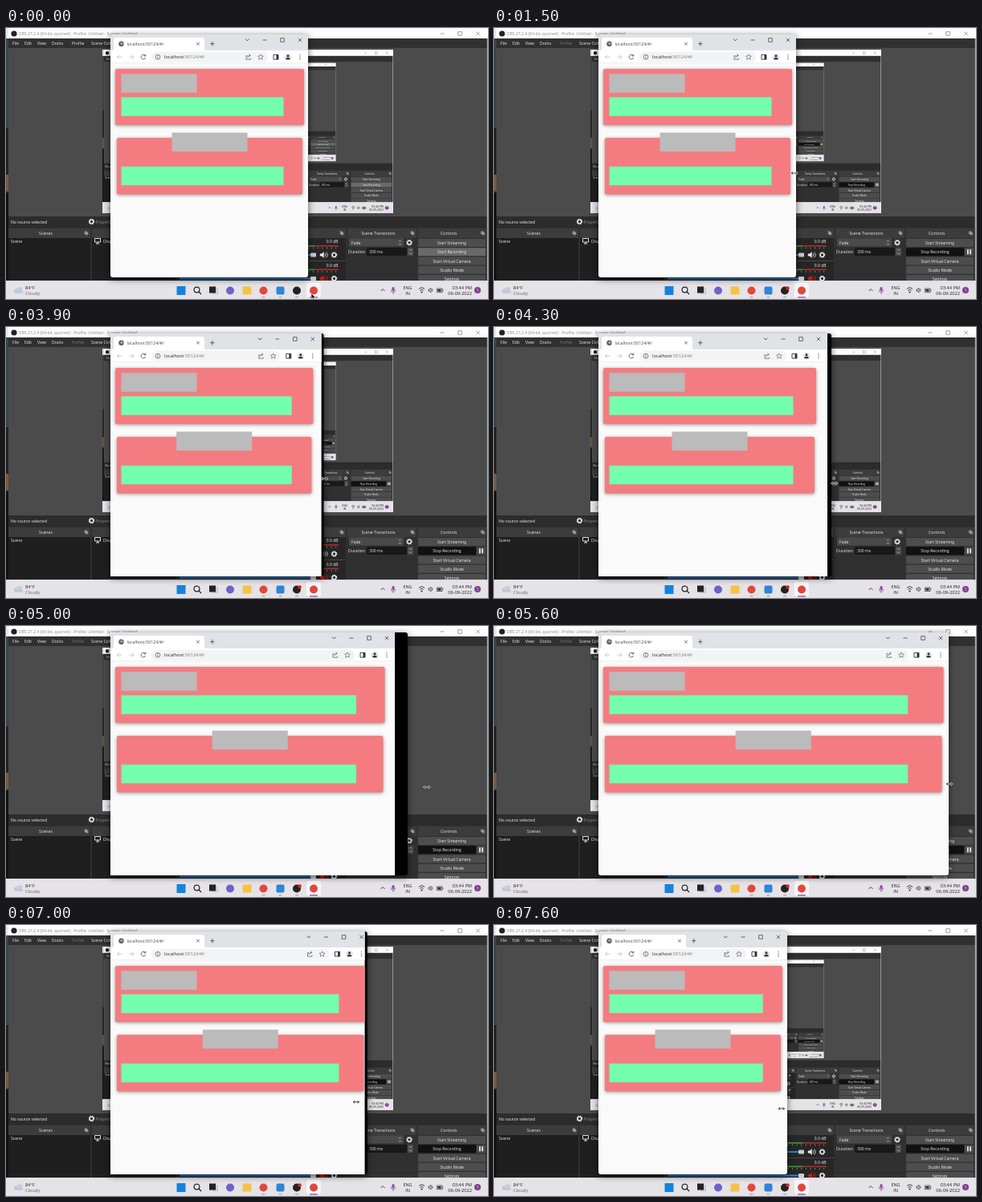
Recreate the animation shown at these times as an HTML page. Size 600 by 338 pixels, loop 8 s.

```html
<!DOCTYPE html>
<html lang="en">
<head>
<meta charset="utf-8">
<style>
html, body { margin: 0; height: 100%; overflow: hidden; background: #fff; }
#stage { display: block; width: 100vw; height: 100vh; }
text { font-family: "Open Sans", "Noto Sans", sans-serif; white-space: pre; }
.on, .rec .off { display: none; }
.rec .on { display: inline; }
.lift { filter: drop-shadow(0 1px 2px #0006); }
.float { filter: drop-shadow(0 2px 4px #0009); }
</style>
</head>
<body>
<svg id="stage" viewBox="0 0 600 338" preserveAspectRatio="none">
  <g id="desk"></g><g id="browser"></g><g id="pointer"></g>
</svg>
<script>
const $ = id => document.getElementById(id);
const rect = (x, y, w, h, fill, more = '') =>
  `<rect x="${x}" y="${y}" width="${Math.max(0, w)}" height="${h}" fill="${fill}" ${more}/>`;
const text = (x, y, s, size = 5.1, fill = '#eee', anchor = 'start') =>
  `<text x="${x}" y="${y}" font-size="${size}" fill="${fill}" text-anchor="${anchor}">${s}</text>`;
const line = (d, stroke = '#eee', w = .7, fill = 'none') =>
  `<path d="${d}" stroke="${stroke}" stroke-width="${w}" fill="${fill}"/>`;
const dot = (x, y, r, fill, more = '') => `<circle cx="${x}" cy="${y}" r="${r}" fill="${fill}" ${more}/>`;
const group = (cls, s) => `<g class="${cls}">${s}</g>`;

const cross = (x, y, r, c) => line(`M${x - r} ${y - r}l${2 * r} ${2 * r}m0 ${-2 * r}l${-2 * r} ${2 * r}`, c);
const dash = (x, y, c) => line(`M${x - 2.5} ${y}h5`, c);
const box = (x, y, c) => line(`M${x - 2.3} ${y - 2.3}h4.6v4.6h-4.6z`, c);
const gear = (x, y) => dot(x, y, 2.3, 'none', 'stroke="#eee" stroke-width="1.3"') +
  dot(x, y, 3.3, 'none', 'stroke="#eee" stroke-width="1.1" stroke-dasharray="1.3 1.3"');
const speaker = (x, y, c) => line(`M${x - 4} ${y - 1.3}h2l2.5-2.2v7l-2.5-2.2h-2z`, c, .4, c) +
  line(`M${x + 2} ${y - 2}q2 2 0 4m1.5-5.5q3.4 3.5 0 7`, c, .8);

function dock(x, w, title) {
  const r = x + w - 7;
  return rect(x, 250, w, 12, '#3c3c3c') + text(x + w / 2 - 4.5, 258, title, 5.2, '#eee', 'middle') +
    line(`M${r} 254h2.5v2.5h-2.5zm1.5 1.3h2.3v2.5h-2.3z`, '#ddd', .6);
}

function button(y, label, fill = '#4d4d4d', w = 84) {
  return rect(513, y, w, 10, fill, 'rx="1"') + text(555, y + 7, label, 5, '#eee', 'middle');
}

function channel(y, c) {
  const ticks = Array.from({ length: 10 }, (_, i) => rect(360 + 5.6 * i, y + 7.5, .7, 1.8, '#aaa')).join('');
  return text(413.5, y + 2, '0.0 dB', 5, '#eee', 'end') +
    rect(216, y + 5, 168, 1.6, '#3f9b3f') + rect(384, y + 5, 30, 1.6, '#b52b2b') + ticks +
    rect(216, y + 16, 166, 2, '#2d7fd8') + rect(379, y + 14.5, 7, 5, '#ccc', 'rx="1"') +
    speaker(395, y + 17, c) + gear(408.5, y + 17);
}

function recorder(depth) {
  const menu = [[8, 'File'], [23, 'Edit'], [39, 'View'], [57, 'Docks'], [106, 'Scene Collection']];
  let s = rect(0, 0, 3, 315, '#34474c') + rect(0, 0, 3, 13, '#e8eaec') + rect(0, 125, 3, 58, '#222') +
    rect(0, 183, 3, 20, '#7b593b') + rect(0, 205, 3, 110, '#111') +
    rect(3, 0, 597, 13, '#fdfdfd') + rect(3, 13, 597, 302, '#303030') + rect(3, 25, 597, 210, '#4b4b4b') +
    rect(598.8, 13, 1.2, 302, '#a3b4b4') + dot(10, 7, 3.6, '#222') +
    text(15.5, 9, 'OBS 27.2.4 (64-bit, quorvel) - Profile: Untitled - Scenes: Untitled', 5.1, '#888') +
    dash(543, 7, '#777') + box(565, 7, '#777') + cross(587.5, 7, 2.3, '#777') +
    menu.map(([x, m]) => text(x, 21, m)).join('') +
    group('off', text(82, 21, 'Profile')) + group('on', text(82, 21, 'Profile', 5.1, '#777'));
  if (depth) s += `<svg x="120" y="27" width="362" height="204" viewBox="0 0 600 338">${desk(depth - 1)}</svg>`;

  s += rect(3, 235, 595, 14, '#2c2c2c') + text(6, 243.5, 'No source selected') +
    gear(106.5, 241.5) + text(111.5, 243.5, 'Properties', 5.1, '#888') +
    dock(3, 102, 'Scenes') + rect(3, 262, 102, 53, '#1f1f1f') + text(6, 267.5, 'Scene') +
    dock(107, 105, 'Sources') + rect(107, 262, 105, 53, '#1f1f1f') +
    line('M110.5 262.5h7v4.5h-7zm3.5 4.5v2m-2 0h4', '#eee', .9) + text(121, 267.5, 'Display Capture') +
    dock(214, 209, 'Audio Mixer') + rect(214, 262, 209, 53, '#262626') +
    channel(266, '#eee') + rect(214, 290, 209, .7, '#555') + channel(295.5, '#e01818') +
    dock(425, 86, 'Scene Transitions') +
    rect(427, 262.5, 68, 10, '#4a4a4a', 'rx="1"') + text(430, 269.5, 'Fade') +
    line('M489 266.5l1.5-1.5l1.5 1.5m-3 2.5l1.5 1.5l1.5-1.5', '#ccc') + gear(502, 267.7) +
    text(426, 281, 'Duration') + rect(449, 274, 50, 10, '#191919', 'rx="1"') + text(452, 281, '300 ms') +
    rect(500, 274, 7, 10, '#4d4d4d', 'rx="1"') + line('M502 277.5l1.5-1.5l1.5 1.5m-3 3l1.5 1.5l1.5-1.5', '#ddd') +
    dock(513, 85.5, 'Controls') + button(263, 'Start Streaming') +
    group('off', button(274.2, 'Start Recording', '#6a6a6a')) +
    group('on', button(274.2, '', '#111', 72) + text(549, 281.2, 'Stop Recording', 5, '#eee', 'middle') +
      rect(586, 274.2, 11, 10, '#4d4d4d', 'rx="1"') + rect(589, 276.2, 1.7, 6, '#eee') + rect(592.2, 276.2, 1.7, 6, '#eee')) +
    button(285.5, 'Start Virtual Camera') + button(296.8, 'Studio Mode') + button(308, 'Settings');
  return s;
}

function taskbar() {
  return rect(0, 315, 600, 23, '#e5e2e8') + rect(0, 315, 600, .6, '#d0ced4') +
    dot(18, 325.5, 2.2, '#eec46a') + dot(12.5, 328, 2.6, '#b9c9de') + dot(16, 327, 3.4, '#c3d0e2') +
    rect(10.5, 327.5, 10.5, 3.2, '#b9c9de', 'rx="1.6"') +
    text(24, 326, '84°F', 5.7, '#222') + text(24, 333.2, 'Cloudy', 5.7, '#666') +
    rect(374, 318, 18, 18, '#f5f4f6', 'rx="2"') +
    rect(212.5, 322, 11, 11, '#1583dc') +
    dot(237.5, 326.5, 3.4, 'none', 'stroke="#222" stroke-width="1.2"') + line('M240 329l3 3', '#222', 1.3) +
    rect(257, 324, 7, 8, '#c9cbd0') + rect(253, 322.5, 8, 8, '#222') +
    dot(279, 327.5, 5, '#6a63c9') + rect(294.5, 322.5, 11, 10, '#f5c344', 'rx="1"') +
    dot(320.5, 327.5, 5, '#e0483b') + rect(336.5, 322.5, 10, 10, '#2c86d8', 'rx="2"') +
    dot(362, 327.5, 5, '#222') + group('on', dot(365.5, 324.5, 2.3, '#e02020')) + dot(383, 327.5, 5, '#e0483b') +
    [320.5, 341.5, 362].map(x => rect(x - 2, 335.3, 4, 1, '#999', 'rx=".5"')).join('') +
    rect(378, 335.2, 10, 1.3, '#85479b', 'rx=".6"') +
    line('M466.5 328l2.5-2.5l2.5 2.5', '#333', .9) +
    rect(480.5, 323, 3, 5.5, '#8b4b9d', 'rx="1.5"') + line('M479.3 326.5q0 3.5 2.7 3.5t2.7-3.5m-2.7 3.5v2', '#8b4b9d') +
    text(500, 325.7, 'ENG', 5.5, '#222', 'middle') + text(500, 333, 'IN', 5.5, '#222', 'middle') +
    line('M514 325.5q3.5-3.3 7 0m-5.6 1.8q2.1-1.9 4.2 0', '#222', .9) + dot(517.5, 329.5, 1, '#222') +
    line('M526 326h1.2l1.8-1.7v5.5l-1.8-1.7h-1.2zm4.5-.6q1.4 1.6 0 3.2', '#222') +
    line('M536.5 325h6.5v4.5h-6.5zm7.3 1.5v1.5', '#222') + rect(537.5, 326, 4, 2.5, '#222') +
    text(580, 325.7, '03:44 PM', 5.7, '#222', 'end') + text(580, 333, '06-09-2022', 5.7, '#222', 'end') +
    dot(587, 327, 4, '#81408f') + text(587, 328.8, '1', 5, '#fff', 'middle');
}

const desk = depth => recorder(depth) + taskbar();

// page = laid-out page edge, ui = toolbar edge, clip = painted edge, outer = frame edge
function browser(page, ui, clip, outer) {
  const ink = '#555', close = Math.min(239, ui - 133);
  const mid = (page + 130) / 2 + .5, bar = 202 + .9 * (page - 376);
  const card = (x, y, h) => rect(x, y, page + 131 - 2 * x, h, '#f47c80', 'rx="2" class="lift"');
  const grey = (x, y) => rect(x, y, 94, 23.6, '#bbb');
  const green = y => rect(143.5, y, bar, 23.4, '#73ffae');
  const star = x => line(`M${x} 32.8l1 2.2l2.4.2l-1.8 1.6l.6 2.4l-2.2-1.3l-2.2 1.3l.6-2.4l-1.8-1.6l2.4-.2z`, ink, .6);

  return rect(130, 8, outer - 130, 303, '#000', 'rx="3" class="float"') +
    `<svg width="${clip}" height="338">` +
    rect(130, 8, clip - 130, 303, '#fafafa', `rx="${outer > clip + 1 ? 0 : 3}"`) +
    line(`M130 28V11q0-3 3-3H${clip}V28z`, 'none', 0, '#dfe2e7') +
    line(`M132 28q2 0 2-2V15q0-3 3-3H${close + 5}q3 0 3 3V26q0 2 2 2z`, 'none', 0, '#fff') +
    rect(130, 28, clip - 130, 16, '#fff') + rect(130, 43.6, clip - 130, .5, '#ddd') +
    dot(143.5, 19.7, 3.2, '#555') + line('M141.5 18.2l2 1l-.5 2m1.8-3.6l-.3 2l1.5 1', '#fff', .7) +
    text(150.5, 21.7, 'localhost:50124/#/', 5.3, '#444') +
    cross(close, 19.7, 1.8, '#444') + line(`M${close + 15} 19.7h5.6m-2.8-2.8v5.6`, '#444', .8) +
    line(`M${ui - 78} 13.7l2.3 2.3l2.3-2.3`, '#333', .8) + dash(ui - 54, 15, '#333') + box(ui - 32, 15, '#333') + cross(ui - 10, 15, 2.2, '#333') +
    line('M144 36.2h-5.5m2.5-2.5l-2.5 2.5l2.5 2.5M153.5 36.2h5.5m-2.5-2.5l2.5 2.5l-2.5 2.5', '#bbb', .8) +
    line('M173 34.2a2.8 2.8 0 1 0 .6 2.8m.2-4.3v2.2h-2.2', ink, .9) +
    rect(181, 29.8, ui - 231, 12.8, '#f1f3f4', 'rx="6.4"') +
    dot(189, 36.2, 2.9, 'none', 'stroke="#555" stroke-width=".7"') + line('M189 35.7v2.2m0-3.7v.8', ink, .8) +
    text(197, 38.4, 'localhost<tspan fill="#777">:50124/#/</tspan>', 5.8, '#222') +
    line(`M${ui - 75.5} 34.5h-1.5v4.7h5.5v-1.5m-4-.5q.3-3 3.5-3m-1.5-1.6l1.8 1.6l-1.8 1.6`, ink) + star(ui - 59) +
    line(`M${ui - 43} 33.3h6v5.8h-6z`, '#333', .9) + rect(ui - 39.5, 33.3, 2.5, 5.8, '#333') +
    dot(ui - 25, 36.2, 4.4, '#e2e4ea') + dot(ui - 25, 34.8, 1.5, '#333') + line(`M${ui - 27.8} 39.3q0-2.5 2.8-2.5t2.8 2.5z`, '#333', 0, '#333') +
    [33.6, 36.2, 38.8].map(y => dot(ui - 10, y, .7, ink)).join('') +
    card(136, 51, 70) + grey(143.5, 57.2) + green(86.4) +
    card(138, 137, 70.6) + grey(mid - 47, 130.5) + green(172.8) + '</svg>';
}

function pointer(t, x, y) {
  if (t < 1500) return line(`M${x} ${y}v7l1.7-1.5l1.2 2.6l1.1-.5l-1.2-2.5h2.3z`, '#fff', .5, '#111');
  const d = `M${x - 3.5} ${y}h7m-5.4-1.6l-1.9 1.6l1.9 1.6m3.5-3.2l1.9 1.6l-1.9 1.6`;
  return line(d, '#fff', 1.6) + line(d, '#111', .8);
}

// time, page, ui, clip, outer, pointer x, pointer y
const keys = [
  [0, 376, 376, 376, 376, 380, 331],
  [1000, 376, 376, 376, 376, 380, 331],
  [1500, 376, 376, 376, 376, 374, 181],
  [2000, 376, 376, 376, 376, 374, 181],
  [2900, 374, 364, 365, 365, 354, 181],
  [3000, 364, 364, 365, 365, 357, 181],
  [3400, 364, 364, 365, 365, 362, 182],
  [4300, 406, 414, 415, 420, 424, 195],
  [5000, 476.5, 484, 484, 500, 524, 201],
  [5200, 485, 496, 496, 510, 538, 200],
  [5600, 564.5, 566, 566, 566, 567, 197],
  [5800, 580, 580, 580, 580, 581, 198],
  [5900, 580, 580, 580, 580, 581, 198],
  [6500, 504, 504, 484, 490, 477, 215],
  [6800, 482, 482, 474, 478, 462, 218],
  [7600, 364, 364, 365, 365, 358, 229],
  [8000, 364, 364, 365, 365, 358, 229]
];

function pose(t) {
  const i = keys.findIndex(k => k[0] > t), a = keys[i - 1], b = keys[i];
  const f = (t - a[0]) / (b[0] - a[0]);
  return a.map((v, n) => v + (b[n] - v) * f).slice(1);
}

let shown = -1;
function draw() {
  const t = Math.floor(performance.now() % 8000 / 100) * 100;
  if (t !== shown) {
    shown = t;
    const [page, ui, clip, outer, x, y] = pose(t);
    $('stage').classList.toggle('rec', t >= 200);
    $('browser').innerHTML = browser(page, ui, clip, outer);
    $('pointer').innerHTML = pointer(t, x, y);
  }
  requestAnimationFrame(draw);
}

$('desk').innerHTML = desk(2);
draw();
</script>
</body>
</html>
```
